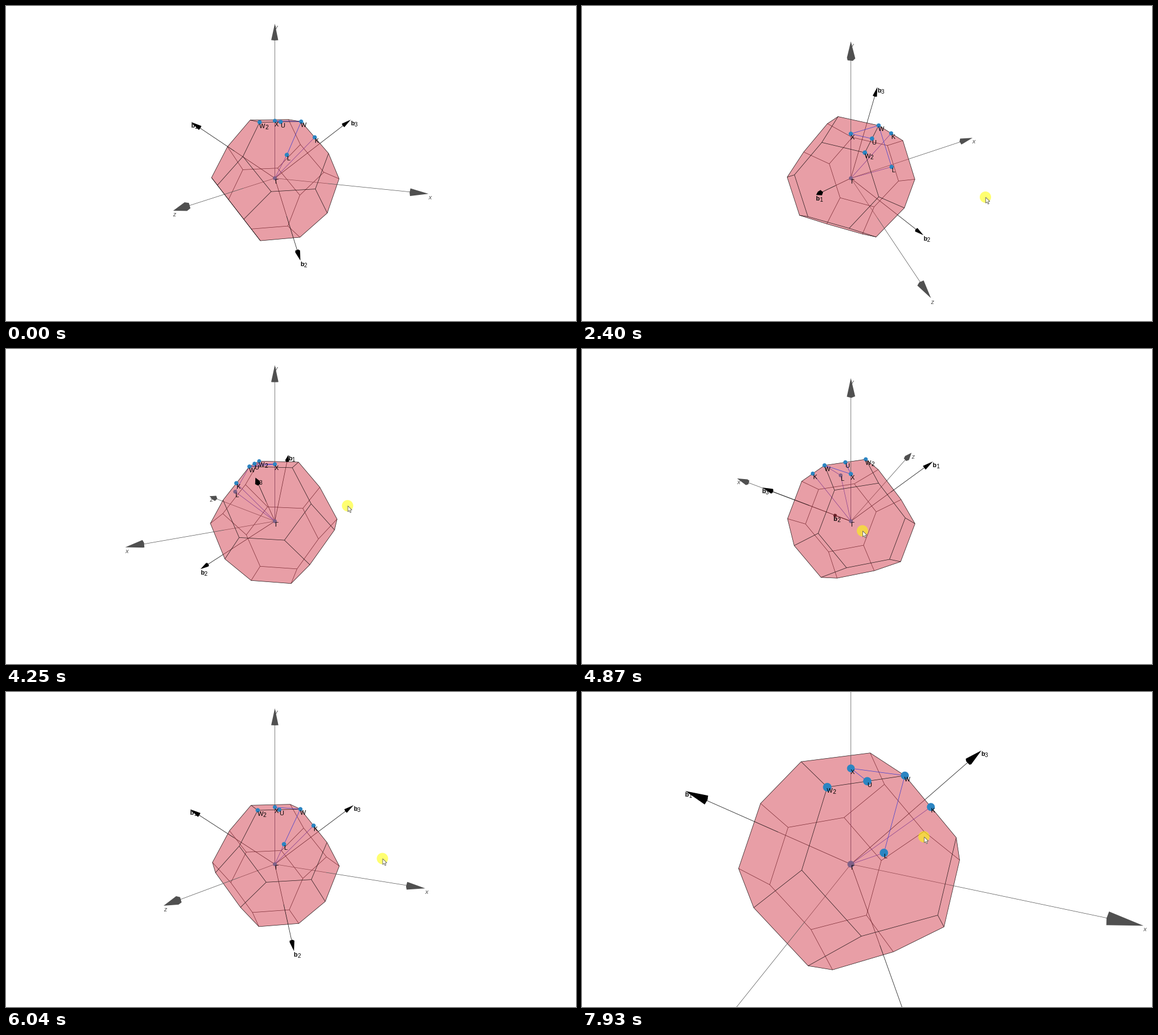
A matplotlib script for the animation above (7990 ms loop, 1006 by 557 pixels).

```python
from itertools import combinations, permutations, product

import matplotlib.pyplot as plt
import numpy as np
from matplotlib.animation import FuncAnimation
from matplotlib.collections import LineCollection, PolyCollection
from matplotlib.patches import Circle, Polygon

W, H, DPI = 1006, 557, 100
PX = 72 / DPI
CENTER = np.array([474.5, 304.5])
FOCAL = 783.4
INTERVAL, FRAMES = 34, 235

S = 0.193            # half the distance from the centre to a square face
DOT = 0.0133
THIN = 0.72 * PX
GRAY, BLACK, EDGE = "#505050", "#000000", "#201416"
PATH, BLUE, PINK = "#3a3ad0", "#2b85c2", "#d33f4f"


def track(rows):
    """Monotone cubic curve through rows of (time, values...).

    Values left out at the end of a row stay as they were.
    """
    full = []
    for row in rows:
        full.append([*row, *(full[-1][len(row):] if full else [])])
    full = np.array(full, float)
    t, v = full[:, 0], full[:, 1:]
    slope = np.diff(v, axis=0) / np.diff(t)[:, None]
    a, b = slope[:-1], slope[1:]
    same = a * b > 0
    m = np.zeros_like(v)
    m[1:-1] = np.where(same, 2 * a * b / np.where(same, a + b, 1), 0)

    def at(time):
        time = min(max(time, t[0]), t[-1])
        i = min(np.searchsorted(t, time, side="right") - 1, len(t) - 2)
        h = t[i + 1] - t[i]
        u = (time - t[i]) / h
        return (v[i] * (1 + 2 * u) * (1 - u) ** 2 + h * m[i] * u * (1 - u) ** 2
                + v[i + 1] * u * u * (3 - 2 * u) + h * m[i + 1] * u * u * (u - 1))
    return at


# time, mouse x, mouse y, azimuth, elevation, camera distance:
# short rows only move the mouse or rest, longer ones drag the view
gesture = track([
    (380, 938, 600, 29.4, 10.4, 3),
    (1180, 671, 327),
    (1735, 620, 294),
    (1796, 620, 297, 29.6, 12.1),
    (2411, 712, 338, -25.2, 44.9),
    (3299, 494, 286, 84.8, 17.7),
    (3640, 380, 281, 146, 15),
    (3840,),
    (4300, 609, 277),
    (4870, 495, 321.5, 210, 40.7),
    (5430, 725, 280, 83, 17),
    (5740, 576, 293),
    (6032, 664.5, 294.5, 33.2, 14.2),
    (6380, 685, 321, 22.3, 30.9),
    (6680,),
    (7330, 598, 265, 22.3, 30.9, 1.729),
    (7720,),
    (7940, 603.5, 256),
])

# truncated octahedron
VERTS = np.array(sorted({p for a, b in product((1, -1), repeat=2)
                         for p in permutations((0, a, 2 * b))}), float)
EDGES = [(a, b) for a, b in combinations(VERTS, 2)
         if abs(np.sum((a - b) ** 2) - 2) < 1e-6]
FACES = [(sign * n, 2.0) for n in np.eye(3) for sign in (1, -1)]
FACES += [(np.array(n, float), 3.0) for n in product((1, -1), repeat=3)]

POINTS = {"Γ": (0, 0, 0), "X": (0, 2, 0), "U": (.5, 2, .5), "K": (1.5, 1.5, 0),
          "L": (1, 1, 1), "W": (1, 2, 0), "W2": (0, 2, 1)}
POINTS = {k: np.array(p, float) for k, p in POINTS.items()}
LEGS = ["ΓX", "XU", "KΓ", "ΓL", "LW", "WX"]

# name, tip, fraction at which the arrow leaves the solid, colour
ARROWS = [(n, e / S, 2 * S, GRAY) for n, e in zip("xyz", np.eye(3))]
ARROWS += [(f"b{i + 1}", 2 - 4 * e, 0.5, BLACK) for i, e in enumerate(np.eye(3))]

RING = np.linspace(0, 2 * np.pi, 28, endpoint=False)
RING = np.column_stack([np.cos(RING), np.sin(RING)])


def cone(tip):
    """Tip and five base corners of an arrow head."""
    size = np.linalg.norm(tip)
    d, up = tip / size, np.array([0, 1.0, 0])
    pts = [tip]
    for th in np.arange(5) * 2 * np.pi / 5:
        v = np.array([np.sin(th), 0, np.cos(th)])
        v = v - v @ d / (1 + d[1]) * (up + d)
        pts.append(0.9 * tip + 0.0238 * size * v)
    return np.array(pts)


def hull(pts):
    pts = sorted(map(tuple, pts))

    def chain(seq):
        out = []
        for p in seq:
            while len(out) > 1 and ((out[-1][0] - out[-2][0]) * (p[1] - out[-2][1])
                                    <= (out[-1][1] - out[-2][1]) * (p[0] - out[-2][0])):
                out.pop()
            out.append(p)
        return out[:-1]
    return chain(pts) + chain(pts[::-1])


class Camera:
    def __init__(self, az, el, dist):
        a, e = np.radians([az, el])
        sa, ca, se, ce = np.sin(a), np.cos(a), np.sin(e), np.cos(e)
        self.axes = np.array([[ca, 0, -sa], [-sa * se, ce, -ca * se],
                              [sa * ce, se, ca * ce]])
        self.dist = dist
        eye = self.axes[2] * dist / S
        self.front = [(n, lim) for n, lim in FACES if eye @ n > lim]

    def project(self, pts):
        x, y, z = self.axes @ (np.atleast_2d(pts) * S).T
        k = FOCAL / (self.dist - z)
        return np.column_stack([CENTER[0] + k * x, CENTER[1] - k * y])

    def scale(self, p):
        return FOCAL / (self.dist - self.axes[2] @ p * S)

    def sees(self, *pts):
        """True if the points share a face turned to the viewer."""
        return any(all(abs(p @ n - lim) < 1e-6 for p in pts)
                   for n, lim in self.front)


CONES = {name: cone(tip) for name, tip, _, _ in ARROWS}

fig = plt.figure(figsize=(W / DPI, H / DPI), dpi=DPI, facecolor="white")
ax = fig.add_axes([0, 0, 1, 1])
ax.set_xlim(0, W)
ax.set_ylim(H, 0)
ax.axis("off")

# one layer behind the translucent body, one in front of it
lines = [LineCollection([], linewidths=THIN, zorder=z) for z in (1, 4)]
shapes = [PolyCollection([], linewidths=0, zorder=z) for z in (2, 5)]
for c in lines + shapes:
    ax.add_collection(c)
body = ax.add_patch(Polygon([(0, 0), (1, 0), (0, 1)], fc=PINK, alpha=0.5,
                            lw=0, zorder=3))


def make_label(name):
    bold, axis = name[0] == "b", name in "xyz"
    style = dict(family="Liberation Sans", va="baseline", ha="left", zorder=6,
                 color=GRAY if axis else BLACK)
    parts = [(ax.text(0, 0, name[0], fontsize=11 * PX,
                      style="italic" if axis else "normal",
                      weight="bold" if bold else "normal", **style), -0.5, 10)]
    if len(name) > 1:
        sub = ax.text(0, 0, name[1], fontsize=10 * PX, **style)
        parts.append((sub, 6 if bold else 9.5, 12))
    return parts


labels = {n: make_label(n) for n in [*CONES, *POINTS]}

halo = ax.add_patch(Circle((0, 0), 10, fc="#ffff00", alpha=0.56, lw=0, zorder=7))
POINTER = np.array([(0, 0), (0, 10.3), (2.4, 8.2), (4.1, 12), (5.8, 11.2),
                    (4.2, 7.6), (7.3, 7.3)]) + (0.5, 0.3)
pointer = ax.add_patch(Polygon(POINTER, fc="#fffff0", ec="#555555",
                               lw=0.8 * PX, zorder=8))


def place(name, xy):
    for text, dx, dy in labels[name]:
        text.set_position((xy[0] + dx, xy[1] + dy))


def update(i):
    # the view refreshes every second tick
    t = 430 + 68.3 * ((i - 12) // 2)
    x, y, *view = gesture(t)
    cam = Camera(*view)
    segs, polys = ([], []), ([], [])

    def line(a, b, color, over):
        segs[over].append((cam.project([a, b]), color))

    for a, b in EDGES:
        line(a, b, EDGE, cam.sees(a, b))
    for a, b in LEGS:
        p, q = POINTS[a], POINTS[b]
        line(p, q, PATH, cam.sees(p, q))
    for name, tip, leave, color in ARROWS:
        over = cam.sees(tip * leave)
        line(tip * 0, tip * leave, color, False)
        line(tip * leave, tip * 0.95, color, over)
        pts = cam.project(CONES[name])
        polys[over].append((hull(pts), color))
        place(name, pts[0])
    for name, p in POINTS.items():
        xy = cam.project(p)[0]
        polys[cam.sees(p)].append((xy + RING * DOT * cam.scale(p), BLUE))
        place(name, xy)

    for k in (0, 1):
        lines[k].set_segments([s for s, _ in segs[k]])
        lines[k].set_color([c for _, c in segs[k]])
        shapes[k].set_verts([s for s, _ in polys[k]])
        shapes[k].set_facecolor([c for _, c in polys[k]])
    body.set_xy(hull(cam.project(VERTS)))

    halo.center = (x, y)
    pointer.set_xy(POINTER + (x, y))
    return []


anim = FuncAnimation(fig, update, frames=FRAMES, interval=INTERVAL,
                     repeat=True, repeat_delay=0, blit=False)
plt.show()
```
